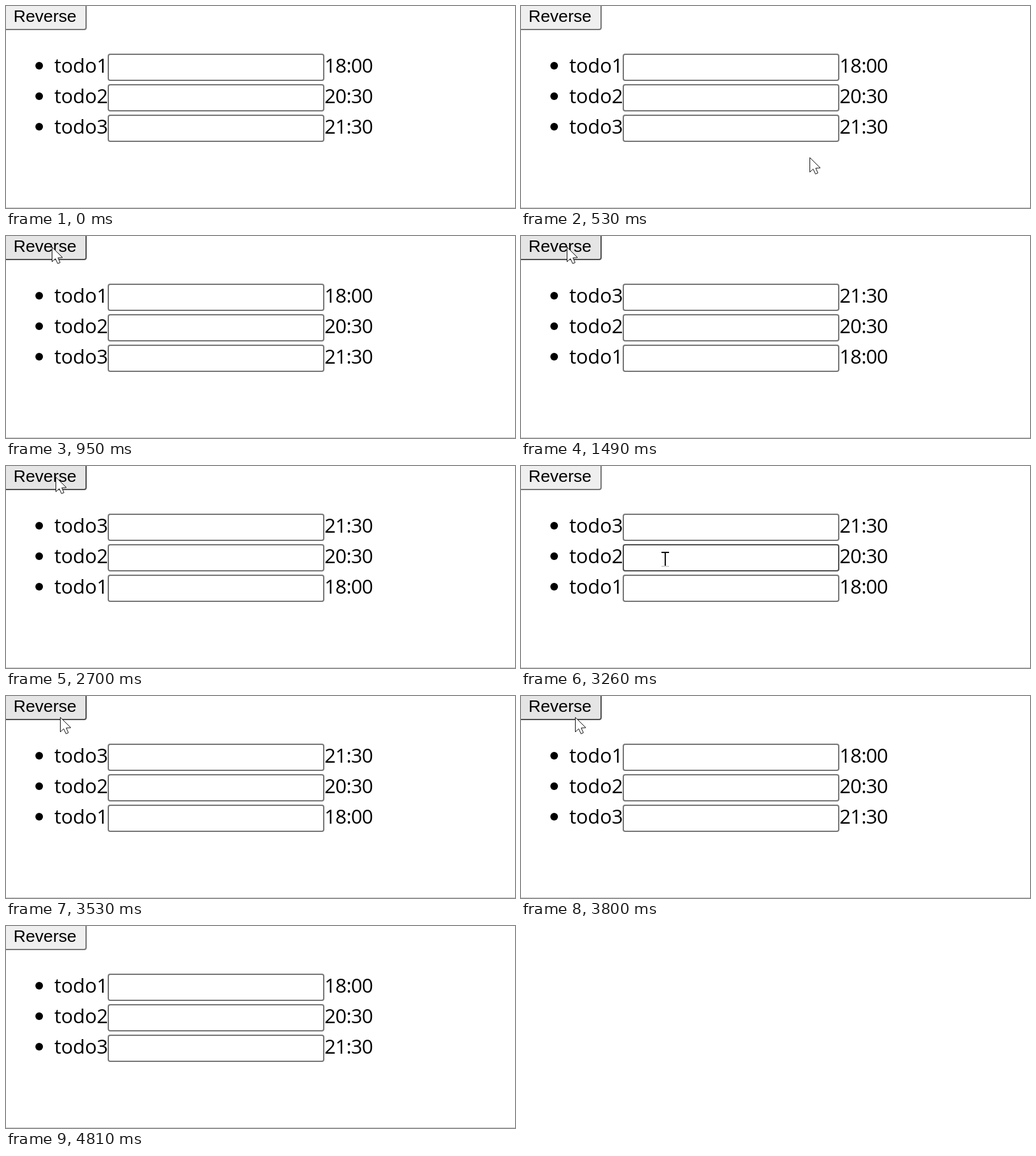
An HTML page for the animation above (4.94 s loop, 801 by 318 pixels).

```html
<!DOCTYPE html>
<html lang="en">
<head>
<meta charset="utf-8">
<style>
  html, body { margin: 0; width: 100%; height: 100%; overflow: hidden; background: #fff; }
  svg { display: block; width: 801px; height: 318px; }
  .list { font: 31px "Open Sans", "Noto Sans", sans-serif; }
  .label { letter-spacing: -.15px; }
  .time { letter-spacing: -.66px; }
  .button { font: 26.67px "Liberation Sans", Arial, sans-serif; }
</style>
</head>
<body>
<svg viewBox="0 0 801 318" xmlns="http://www.w3.org/2000/svg">
  <rect id="button" x="-4" y="-10" width="130" height="47" rx="3" stroke-width="2"/>
  <text class="button" x="11.7" y="25">Reverse</text>
  <g id="rows" class="list"></g>
  <path d="M0 317.5H801" stroke="#c8c8c8"/>
  <path id="arrow" d="M.5 .7V23.5L5.8 18.7L9.4 26.5L13.2 24.8L9.8 17.3L17 16.9Z" fill="#fff" stroke="#111"/>
  <g id="beam" fill="none" stroke="#111" stroke-width="2">
    <path d="M-6 -10H-1L0 -9L1 -10H6M0 -9V11"/>
    <path d="M-6 12H6" stroke="#d4d4d4"/>
  </g>
</svg>
<script>
const LOOP = 4940;
const STEP = 70;
const ROW = 48;
const TODOS = [["todo1", "18:00"], ["todo2", "20:30"], ["todo3", "21:30"]];

// Pointer stops; the pointer eases from one to the next in steps.
const stops = [
  { t: 390, x: 549, y: 289 },
  { t: 880, x: 72, y: 31 },
  { t: 950, x: 72, y: 17 },
  { t: 2630, x: 72, y: 17 },
  { t: 2700, x: 78, y: 17 },
  { t: 2980, x: 235, y: 152 },
  { t: 3190, x: 243, y: 159 },
  { t: 3530, x: 85, y: 33 },
  { t: 4550, x: 85, y: 33 },
  { t: 4750, x: 95, y: 252 }
];
const LEAVE = 4810;
const clicks = [{ down: 1350, up: 1490 }, { down: 3730, up: 3800 }];

const $ = id => document.getElementById(id);
const smooth = u => u * u * (3 - 2 * u);
const mix = (a, b, u) => a + (b - a) * u;
const within = (v, a, b) => v >= a && v <= b;

const rows = TODOS.map((_, i) => {
  const row = document.createElementNS("http://www.w3.org/2000/svg", "g");
  row.setAttribute("transform", `translate(0 ${ROW * i})`);
  row.innerHTML = `<circle cx="52.2" cy="94" r="6"/>
    <text class="label" x="76" y="105"></text>
    <rect x="161" y="76" width="339" height="41" rx="3" stroke-width="2"/>
    <text class="time" x="501.3" y="105"></text>`;
  $("rows").append(row);
  const [label, time] = row.querySelectorAll("text");
  return { label, time, box: row.querySelector("rect") };
});

function pointerAt(t) {
  if (t < stops[0].t || t >= LEAVE) return null;
  const next = stops.findIndex(s => s.t > t);
  if (next < 0) return stops[stops.length - 1];
  const a = stops[next - 1], b = stops[next];
  const steps = Math.round((b.t - a.t) / STEP);
  const u = smooth(Math.floor((t - a.t) / (b.t - a.t) * steps + .001) / steps);
  return { x: mix(a.x, b.x, u), y: mix(a.y, b.y, u) };
}

function place(el, spot) {
  el.style.display = spot ? "" : "none";
  if (spot) el.setAttribute("transform", `translate(${Math.round(spot.x)} ${Math.round(spot.y)})`);
}

function paint(el, fill, stroke) {
  el.setAttribute("fill", fill);
  el.setAttribute("stroke", stroke);
}

function draw(t) {
  const spot = pointerAt(t);
  const over = (left, top, right, bottom) =>
    spot && within(spot.x, left, right) && within(spot.y, top, bottom);
  const reversed = t >= clicks[0].up && t < clicks[1].up;

  if (clicks.some(c => t >= c.down && t < c.up)) paint($("button"), "#f5f5f5", "#8d8d8d");
  else if (over(0, 0, 127, 38)) paint($("button"), "#e5e5e5", "#4f4f4f");
  else paint($("button"), "#efefef", "#767676");

  let overText = false;
  rows.forEach((row, i) => {
    const [label, time] = TODOS[reversed ? 2 - i : i];
    row.label.textContent = label;
    row.time.textContent = time;
    const top = 75 + ROW * i, bottom = top + 43;
    const overBox = over(160, top, 501, bottom);
    paint(row.box, "#fff", overBox ? "#4f4f4f" : "#767676");
    overText ||= overBox || over(76, top, 160, bottom);
  });

  place($("arrow"), overText ? null : spot);
  place($("beam"), overText ? spot : null);
}

const start = performance.now();
function tick() {
  draw((performance.now() - start) % LOOP);
  requestAnimationFrame(tick);
}
tick();
</script>
</body>
</html>
```
